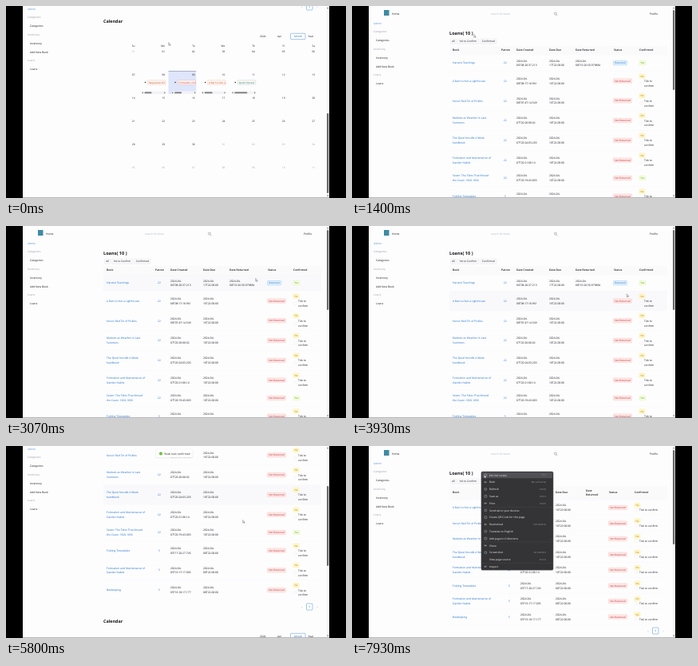
Recreate the animation shown at these times as an HTML page. Size 426 px wide and 240 px high, loop 8000 ms.

```html
<!DOCTYPE html>
<html lang="en">
<head>
<meta charset="utf-8">
<title>Library loans</title>
<style>
  html, body { margin: 0; width: 100%; height: 100%; overflow: hidden; background: #000; }
  svg { display: block; }
  #stage { width: 100vw; height: 100vh; }
  text { font-family: "Open Sans", "Noto Sans", sans-serif; text-rendering: geometricPrecision; white-space: pre; }
</style>
</head>
<body>
<svg id="stage" viewBox="0 0 426 240">
  <rect width="426" height="240" fill="#000"/>
  <svg x="21" width="384" height="240" viewBox="21 0 384 240">
    <rect x="21" width="384" height="240" fill="#fdfdfe"/>
    <g id="page">
      <g id="nav"></g>
      <rect id="rowHover" x="122" width="273" fill="#f9f9fb"/>
      <g id="allLoans"></g>
      <g id="openLoans"></g>
      <g id="tabs"></g>
    </g>
    <g id="side"></g>
    <g id="bar"></g>
    <rect x="21" y="239" width="384" height="1" fill="#b8b8bc"/>
    <g id="toast"></g>
    <g id="menu"></g>
    <g id="cursor">
      <path id="arrow" d="M0 0V3.6L.9 2.8 1.5 4.1 2.1 3.8 1.5 2.6H2.6Z" fill="#fff" stroke="#555" stroke-width=".4"/>
      <path id="hand" d="M.8 .3Q1.4-.3 1.8.4V2L3.9 2.5Q4.3 2.7 4.1 3.6L3.6 5.4H1.4L-.1 3.3Q.1 2.7.8 3.2Z" fill="#fff" stroke="#333" stroke-width=".45"/>
    </g>
  </svg>
</svg>
<script>
const $ = id => document.getElementById(id);
const INK = '#17181c', BLUE = '#1f70cc', LINE = '#f5f5f8';
const LOOP = 8000;

const text = (x, y, s, fill = INK, size = 3.35, weight = 400, anchor = 'start') =>
  `<text x="${x}" y="${y + size * .36}" fill="${fill}" font-size="${size}" font-weight="${weight}" text-anchor="${anchor}">${s}</text>`;
const rect = (x, y, w, h, fill, stroke = 'none', r = 0) =>
  `<rect x="${x}" y="${y}" width="${w}" height="${h}" rx="${r}" fill="${fill}" stroke="${stroke}" stroke-width=".4"/>`;
const lines = (x, y, list, gap, fill) =>
  list.map((s, i) => text(x, y + (i - (list.length - 1) / 2) * gap, s, fill)).join('');

// width, ink, fill, edge
const TAGS = {
  'Not Returned': [23, '#b81c2c', '#ffecea', '#ffb0aa'],
  'Returned': [17, '#0d5fb5', '#e6f4ff', '#7dbcf7'],
  'Yes': [8, '#4c8a12', '#f7ffe2', '#d3ec9c'],
  'No': [7, '#a87405', '#fff9d0', '#ffe27a']
};
function tag(x, y, label) {
  const [w, ink, fill, edge] = TAGS[label];
  return rect(x, y - 2.6, w, 5.2, fill, edge, .8) + text(x + w / 2, y, label, ink, 3.1, 500, 'middle');
}

// title lines, patron, created, due, confirmed
const LOANS = [
  [['Harvest Teachings'], 22, '06T08:20:37.213', '17T22:00:00', true],
  [['A Barn is Not a Lighthouse'], 22, '08T08:17:18.961', '16T22:00:00'],
  [["Nora's Red Tin of Pickles"], 22, '08T07:47:14.549', '16T22:00:00'],
  [['Markets as Weather in Late', 'Summers'], 22, '07T20:20:08.02', '10T22:00:00'],
  [['The Quiet Noodle A Week', 'handbook'], 22, '07T20:24:03.203', '10T22:00:00'],
  [['Formation and Maintenance of', 'Garden Habits'], 22, '07T20:21:08.14', '10T22:00:00'],
  [['Seven: The Tides That Moved', 'the Coast: 1820-1836'], 22, '07T20:19:43.003', '10T22:00:00', true],
  [['Folding Timetables'], 5, '05T17:20:27.745', '08T22:00:00'],
  [['Formation and Maintenance of', 'Garden Habits'], 5, '05T16:17:17.005', '08T22:00:00'],
  [['Beekeeping'], 5, '05T16:18:17.177', '08T22:00:00']
];

const rowBounds = [];
LOANS.reduce((top, loan) => {
  const h = loan[4] ? 20.2 : 24.75;
  rowBounds.push([top, h]);
  return top + h;
}, 61);

const pager = y => text(371, y, '‹', '#b5b5bb', 5, 400, 'middle') + text(390, y, '›', '#b5b5bb', 5, 400, 'middle') +
  rect(376.5, y - 4, 7.5, 8, '#fff', BLUE, 1) + text(380.2, y, '1', BLUE, 3.2, 600, 'middle');

function tableHead(cols, y, bottom) {
  const names = ['Book', 'Patron', 'Date Created', 'Date Due', 'Date Returned', 'Status', 'Confirmed'];
  return rect(122, 50, 273, bottom - 50, '#fafafb') + rect(122, bottom, 273, .3, LINE) +
    names.map((name, i) => bottom > 65 && i === 4
      ? name.split(' ').map((s, k) => text(cols[i], y - 2.7 + k * 5.4, s, INK, 3.4, 600)).join('')
      : text(cols[i], y, name, INK, 3.4, 600)).join('');
}

function loanRow(cols, loan, y, top, h, narrow) {
  const [title, patron, created, due, done] = loan;
  const date = (x, end) => lines(x, y, ['2024-04-', end], 5.6);
  let s = rect(122, top + h, 273, .3, LINE) + lines(cols[0], y, title, 5.6, BLUE) +
    text(cols[1] + 5, y, patron, BLUE, 3.3, 500, 'middle') + date(cols[2], created) + date(cols[3], due);
  const returned = loan === LOANS[0];
  if (returned) s += date(cols[4], '08T10:26:50.979884');
  s += tag(cols[5] - .5, y, returned ? 'Returned' : 'Not Returned');
  if (done) return s + tag(cols[6], y, 'Yes');
  const tickY = narrow ? y + 3 : y + 3.3;
  return s + tag(cols[6], narrow ? y - 3 : y - 6, 'No') +
    rect(cols[6] + .8, tickY - 1.5, 3, 3, '#fff', '#e8e8ec', .6) +
    (narrow ? text(cols[6] + 6, tickY, 'Tick to confirm') : lines(cols[6] + 6, tickY, ['Tick to', 'confirm'], 5.8));
}

function calendar() {
  const oy = 307, right = c => 161.5 + c * 37.6;
  let s = text(122, oy + 19, 'Calendar', INK, 5.4, 700) +
    text(318, oy + 38, '2024', INK, 3.2) + text(340, oy + 38, 'Apr', INK, 3.2) +
    rect(356.5, oy + 34.3, 18.5, 7.4, '#fff', BLUE, 1) + text(366, oy + 38, 'Month', BLUE, 3.3, 400, 'middle') +
    text(378.5, oy + 38, 'Year', INK, 3.3) +
    rect(203.5, oy + 81, 34.7, 29, '#dfe6fb') + rect(203.5, oy + 81, 34.7, .5, '#777c92');
  ['Su', 'Mo', 'Tu', 'We', 'Th', 'Fr', 'Sa'].forEach((d, c) => s += text(right(c), oy + 50, d, INK, 3.2, 400, 'end'));
  for (let r = 0; r < 6; r++) for (let c = 0; c < 7; c++) {
    const date = new Date(2024, 2, 31 + r * 7 + c);
    const fill = date.getMonth() === 3 ? INK : '#a9a9b0';
    s += text(right(c), oy + 57 + r * 29, String(date.getDate()).padStart(2, '0'), fill, 3.2, 400, 'end');
  }
  const events = [['Requested Fol', '#c24a1e', 9], ['Formation of G', '#c92a33', 9], ['A Barn is Not a', '#c24a1e', 10], ['Quiet Harvest', '#0b7f7d', 16]];
  events.forEach(([name, ink, w], i) => {
    const x = 170 + i * 37.6;
    s += `<circle cx="${x + 4.5}" cy="${oy + 95.5}" r=".8" fill="#333"/>` +
      rect(x + 7.5, oy + 92.7, 22.5, 5.6, '#fff6f1', ink + '55', .7) + text(x + 9, oy + 95.5, name, ink, 3) +
      rect(x, oy + 106.5, 30, 3.6, '#f3f3f5') + rect(x + 3.5, oy + 107.4, w, 1.9, '#77777c', 'none', .9) +
      `<path d="M${x + 1.6} ${oy + 107.2}v2.2l-1.3-1.1zM${x + 28.5} ${oy + 107.2}v2.2l1.3-1.1z" fill="#555"/>`;
  });
  return s;
}

const WIDE = [126, 187, 206, 247, 280, 328, 360];
const NARROW = [126, 192, 211, 255, 293, 322, 354];

$('allLoans').innerHTML = tableHead(WIDE, 55, 61) +
  LOANS.map((loan, i) => {
    const [top, h] = rowBounds[i];
    return loanRow(WIDE, loan, top + h / 2, top, h, false);
  }).join('') + pager(308) + calendar();

$('openLoans').innerHTML = tableHead(NARROW, 58, 67) +
  LOANS.filter(loan => !loan[4]).map((loan, i) => {
    const title = loan[0].join(' ');
    const fitted = title.length < 35 && loan[0][1] === 'Summers' ? [[title], ...loan.slice(1)] : loan;
    return loanRow(NARROW, fitted, 77 + i * 19.5, 67.2 + i * 19.5, 19.5, true);
  }).join('') + pager(231);

$('nav').innerHTML = rect(40, 5, 6.5, 7, '#3f8ba3') + text(50, 10, 'Home') +
  text(174, 10, 'search for book', '#a9bac9', 3.3) +
  '<path d="M256 10.8l1.5 1.5M256.4 9.5a1.5 1.5 0 1 1-3 0a1.5 1.5 0 1 1 3 0" fill="none" stroke="#777" stroke-width=".5"/>' +
  text(373, 10, 'Profile') + text(122, 33.5, 'Loans( 10 )', INK, 5.6, 700);

$('side').innerHTML = [
  ['Admin', 22, '#5c93cf'], ['Categories', 32], ['Categories', 43, INK], ['Inventory', 54], ['Inventory', 65, INK],
  ['Add New Book', 76, INK], ['Loans', 86], ['Loans', 97, INK]
].map(([s, y, fill = '#9b9daa']) => text(fill === INK ? 30 : 27, y, s, fill)).join('');

const TABS = [['All', 123.5, 7], ['Yet to Confirm', 132, 27], ['Confirmed', 161, 20]];
$('tabs').innerHTML = TABS.map(([s, x, w]) =>
  rect(x, 41, w, 6.4, '#f8f8fa', '#e4e4ea', .8) + text(x + w / 2, 44.2, s, INK, 3.2, 400, 'middle')).join('');

$('bar').innerHTML = rect(401.5, 0, 3.5, 240, '#f7f7f8') +
  '<path d="M403.2 1.4l1.2 1.8h-2.4zM403.2 238.2l1.2-1.8h-2.4z" fill="#777"/>' +
  '<rect id="thumb" x="402" width="2.3" rx="1.1" fill="#6c6c6e"/>';

$('toast').innerHTML = rect(187.5, 4.5, 47, 11, '#0000000d', 'none', 2) + rect(188, 4, 46, 10.6, '#fff', '#e9e9ed', 1.8) +
  '<circle cx="194" cy="9.4" r="2" fill="#52b51f"/><path d="M193 9.4l.8.8 1.3-1.6" fill="none" stroke="#fff" stroke-width=".5"/>' +
  text(198.5, 9.4, 'Book loan confirmed', INK, 3.3);

const MENU = [
  ['Exit full screen', 'F11'], ['Back', 'Alt+Left arrow'], ['Refresh', 'Ctrl+R'], ['Save as', 'Ctrl+S'], ['Print', 'Ctrl+P'],
  ['Send tab to your devices', ''], ['Create QR Code for this page', ''], ['Read aloud', 'Ctrl+Shift+U'],
  ['Translate to English', ''], ['Add page to Collections', '›'], ['Share', ''], ['Screenshot', 'Ctrl+Shift+S'],
  ['View page source', 'Ctrl+U'], ['Inspect', '']
];
$('menu').innerHTML = rect(161.5, 32.5, 91, 123.5, '#00000030', 'none', 2) + rect(162, 32, 90, 123, '#343437', '#55555a', 1.6) +
  rect(163, 33, 88, 7.3, '#505055', 'none', 1) +
  MENU.map(([name, key], i) => {
    const y = 36.4 + i * 8.8;
    const icon = i === 12 ? '' : i % 3 === 1
      ? `<path d="M169 ${y}h-3l1.2-1.2M166 ${y}l1.2 1.2" fill="none" stroke="#ddd" stroke-width=".45"/>`
      : rect(166, y - 1.4, 2.8, 2.8, 'none', '#d5d5d8', i % 3 ? 1.4 : .5);
    return icon + text(172, y, name, '#f4f4f5', 3.3) + text(key === '›' ? 249 : 243, y, key, '#a5a5aa', 2.8, 400, 'end');
  }).join('') + [76, 119.8, 146.5].map(y => rect(162, y, 90, .3, '#4c4c50')).join('');

const CURSOR = [
  [0, 205, 47], [500, 205, 47], [1100, 154, 37], [1900, 154, 37], [2700, 300, 70], [3070, 314, 67], [3500, 314, 67],
  [4200, 361, 96], [4950, 361, 96], [5300, 298, 94], [5950, 298, 94], [6350, 145, 45], [6550, 145, 45],
  [6730, 166, 46], [7100, 166, 46], [7350, 163, 34], [7700, 167, 38], [LOOP, 167, 38]
];
const SCROLL = [[0, 307], [250, 307], [1050, 0], [5250, 0], [5700, 107], [5900, 107], [6250, 0], [LOOP, 0]];
const TOAST = [[0, 0], [4430, 0], [4630, 1], [6200, 1], [6400, 0], [LOOP, 0]];
const HOVER_LAG = 280;

function at(track, t, col = 1) {
  const i = Math.max(1, track.findIndex(k => k[0] > t));
  const a = track[i - 1], b = track[i], u = (t - a[0]) / (b[0] - a[0]);
  return a[col] + (b[col] - a[col]) * u * u * (3 - 2 * u);
}
const show = (id, on) => $(id).setAttribute('display', on ? 'inline' : 'none');
const move = (id, x, y) => $(id).setAttribute('transform', `translate(${x} ${y})`);

function draw(t) {
  const scroll = at(SCROLL, t), x = at(CURSOR, t), y = at(CURSOR, t, 2);
  const filtered = t >= 6500, menuOpen = t >= 7400, toast = at(TOAST, t);

  move('page', 0, -scroll);
  move('side', 0, -Math.min(scroll, 18));
  show('allLoans', !filtered);
  show('openLoans', filtered);

  // The row highlight trails behind while the page scrolls.
  const hoverY = y + at(SCROLL, Math.max(0, t - HOVER_LAG));
  const row = rowBounds.find(([top, h]) => hoverY >= top && hoverY < top + h);
  const hovering = !filtered && row && x > 122;
  show('rowHover', hovering);
  if (hovering) {
    $('rowHover').setAttribute('y', row[0]);
    $('rowHover').setAttribute('height', row[1]);
  }

  const overTab = TABS.map(([, left, w]) => x >= left && x <= left + w && y + scroll > 41 && y + scroll < 48);
  $('tabs').querySelectorAll('rect').forEach((box, i) => box.setAttribute('fill', overTab[i] ? '#dfe1f0' : '#f8f8fa'));

  $('thumb').setAttribute('y', 5 + scroll / 307 * 129);
  $('thumb').setAttribute('height', filtered ? 118 : 100);
  $('toast').setAttribute('opacity', toast);
  move('toast', 0, (toast - 1) * 8);
  show('menu', menuOpen);

  const pointing = !menuOpen && (overTab.includes(true) || (x > 359 && y > 92));
  show('hand', pointing);
  show('arrow', !pointing);
  move('cursor', x - 1.3, y - 1.5);
}

function tick() {
  draw(performance.now() % LOOP);
  requestAnimationFrame(tick);
}
tick();
</script>
</body>
</html>
```
